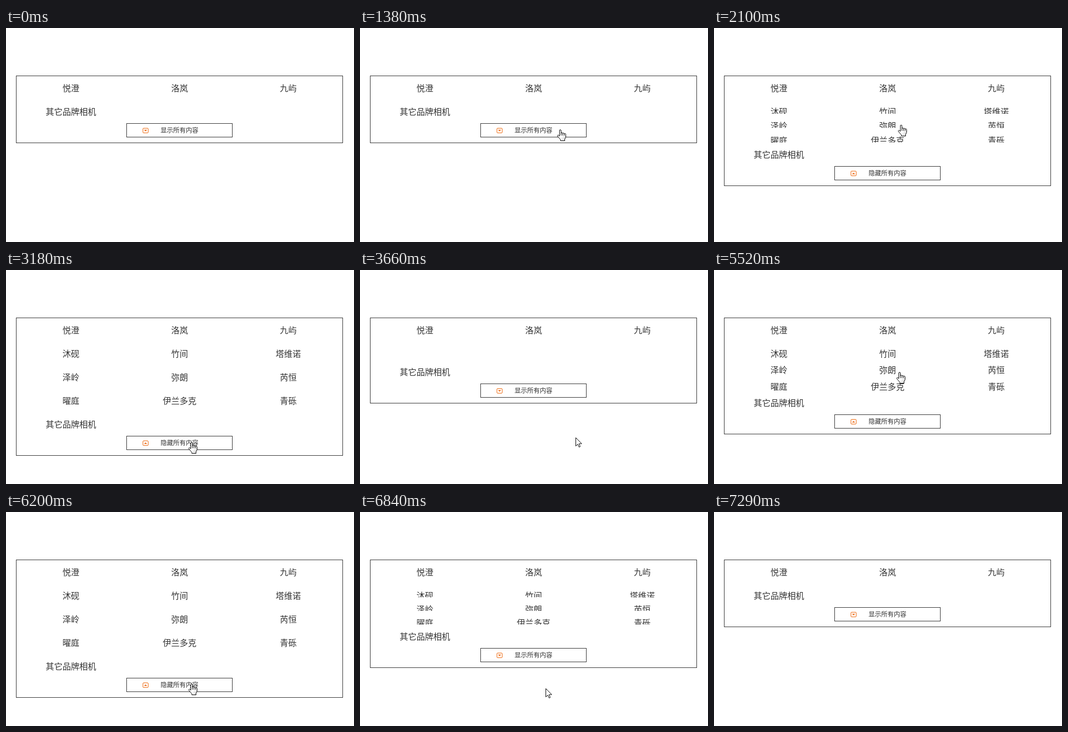
An HTML page that plays this animation: 662 by 409 pixels, repeating every 7.92 s.

```html
<!DOCTYPE html>
<html lang="zh-CN">
<head>
<meta charset="utf-8">
<title>展开与收起</title>
<style>
  html, body { margin: 0; width: 100%; height: 100%; overflow: hidden; background: #fff; }
  #stage { display: block; width: 100%; height: 100%; }
  text { font: 16px "Noto Sans CJK SC", "Noto Sans CJK", sans-serif; fill: #333; text-anchor: middle; }
  #label { font-size: 12px; }
  .frame { fill: none; stroke: #333; }
  .row { overflow: hidden; }
  #cursor path { fill: #fff; stroke: #000; stroke-linejoin: round; }
  #hand .body { fill: url(#shade); }
  #hand .gap { fill: none; }
</style>
</head>
<body>
<svg id="stage" viewBox="0 0 662 409">
  <defs>
    <linearGradient id="shade" x1="0" y1="0" x2="1" y2="1">
      <stop offset=".55" stop-color="#fff"/>
      <stop offset="1" stop-color="#c8c8c8"/>
    </linearGradient>
  </defs>
  <rect id="box" class="frame" x="19.5" y="91.5" width="621" height="128"/>
  <g id="list"></g>
  <g id="foot">
    <text x="123.5" y="166">其它品牌相机</text>
    <rect class="frame" x="229.5" y="182.5" width="201" height="26"/>
    <rect x="260.5" y="191.5" width="10" height="9" rx="1.5" fill="#fff" stroke="#ee6a10"/>
    <path id="tip" fill="#ee6a10"/>
    <text id="label" x="330" y="200"></text>
  </g>
  <g id="cursor">
    <path id="arrow" d="M.5 .5V16.5L4.2 13L6.7 18.5L9 17.5L6.6 12H11.8Z"/>
    <g id="hand" transform="translate(-5)">
      <path class="body" d="M4.5 12.5V2Q4.5 .5 6 .5T7.5 2V7.5Q7.5 6 9 6T10.5 7.5Q10.5 6.8 12 6.8T13.5 8.3Q13.5 7.8 15 7.8T16.5 9.5V14.5L14.5 18.5V21.5H6.5V19.5L1 13Q0 11 1.5 10.5Q2.8 10.3 4.5 12.5Z"/>
      <path class="gap" d="M7.5 7V11.5M10.5 7.5V11.5M13.5 8.5V11.5"/>
    </g>
  </g>
</svg>
<script>
const LOOP = 7920, ROW = 45, SLIDE = 400;
const NAMES = [
  '悦澄 洛岚 九屿',
  '沐砚 竹间 塔维诺',
  '泽岭 弥朗 芮恒',
  '曜庭 伊兰多克 青砾'
];
// pointer moves; those that end on the button also press it
const ENTRY = { x: 595, y: 273 };
const MOVES = [
  { from: 1070, to: 1530, x: 355, y: 185, press: 1873 },
  { from: 2246, to: 2790, x: 435, y: 378 },
  { from: 2790, to: 3180, x: 352, y: 329, press: 3396 },
  { from: 3490, to: 3810, x: 426, y: 318 },
  { from: 4389, to: 5030, x: 352, y: 195, press: 5269 },
  { from: 5668, to: 6353, x: 352, y: 335, press: 6660 },
  { from: 6834, to: 7290, x: 385, y: 412 }
];

const $ = id => document.getElementById(id);
const swing = p => 0.5 - Math.cos(Math.PI * p) / 2;
const easeOut = p => 1 - (1 - p) ** 2;

function add(parent, tag, attrs, content = '') {
  const el = document.createElementNS('http://www.w3.org/2000/svg', tag);
  for (const key in attrs) el.setAttribute(key, attrs[key]);
  el.textContent = content;
  return parent.appendChild(el);
}

// the first row is always shown, the others slide open
const rows = NAMES.map((names, i) => {
  const row = add($('list'), 'svg', { class: 'row', x: 0, y: 92, width: 662, height: ROW });
  names.split(' ').forEach((name, c) => add(row, 'text', { x: 123.5 + 206.7 * c, y: 29 }, name));
  return row;
}).slice(1);

function openness(t, presses) {
  if (!presses.length) return 0;
  const p = swing(Math.min(1, (t - presses[presses.length - 1]) / SLIDE));
  return presses.length % 2 ? p : 1 - p;
}

function pointer(t, shift) {
  const i = MOVES.filter(m => m.from <= t).length - 1;
  if (i < 0) return null;
  const move = MOVES[i], last = MOVES[i - 1] || ENTRY;
  const p = easeOut(Math.min(1, (t - move.from) / (move.to - move.from)));
  const x = Math.round(last.x + (move.x - last.x) * p);
  const y = Math.round(last.y + (move.y - last.y) * p);
  const over = x > 229 && x < 431 && y >= 182 + shift && y < 209 + shift;
  return { x, y, hand: over || (p === 1 && 'press' in move) };
}

function draw(t) {
  const presses = MOVES.map(m => m.press).filter(at => at <= t);
  const opened = presses.length % 2 === 1;
  const h = ROW * openness(t, presses);
  const shift = Math.round(h * rows.length);

  $('box').setAttribute('height', 128 + shift);
  $('foot').setAttribute('transform', `translate(0 ${shift})`);
  rows.forEach((row, i) => {
    row.setAttribute('y', 137 + Math.round(h * i));
    row.setAttribute('height', Math.round(h));
  });
  $('label').textContent = opened ? '隐藏所有内容' : '显示所有内容';
  $('tip').setAttribute('d', opened ? 'M262.5 197.5h6l-3-3z' : 'M262.5 194.5h6l-3 3z');

  const at = pointer(t, shift);
  $('cursor').style.display = at ? '' : 'none';
  if (!at) return;
  $('cursor').setAttribute('transform', `translate(${at.x} ${at.y})`);
  $('hand').style.display = at.hand ? '' : 'none';
  $('arrow').style.display = at.hand ? 'none' : '';
}

const start = performance.now();
function tick() {
  draw((performance.now() - start) % LOOP);
  requestAnimationFrame(tick);
}
tick();
</script>
</body>
</html>
```
